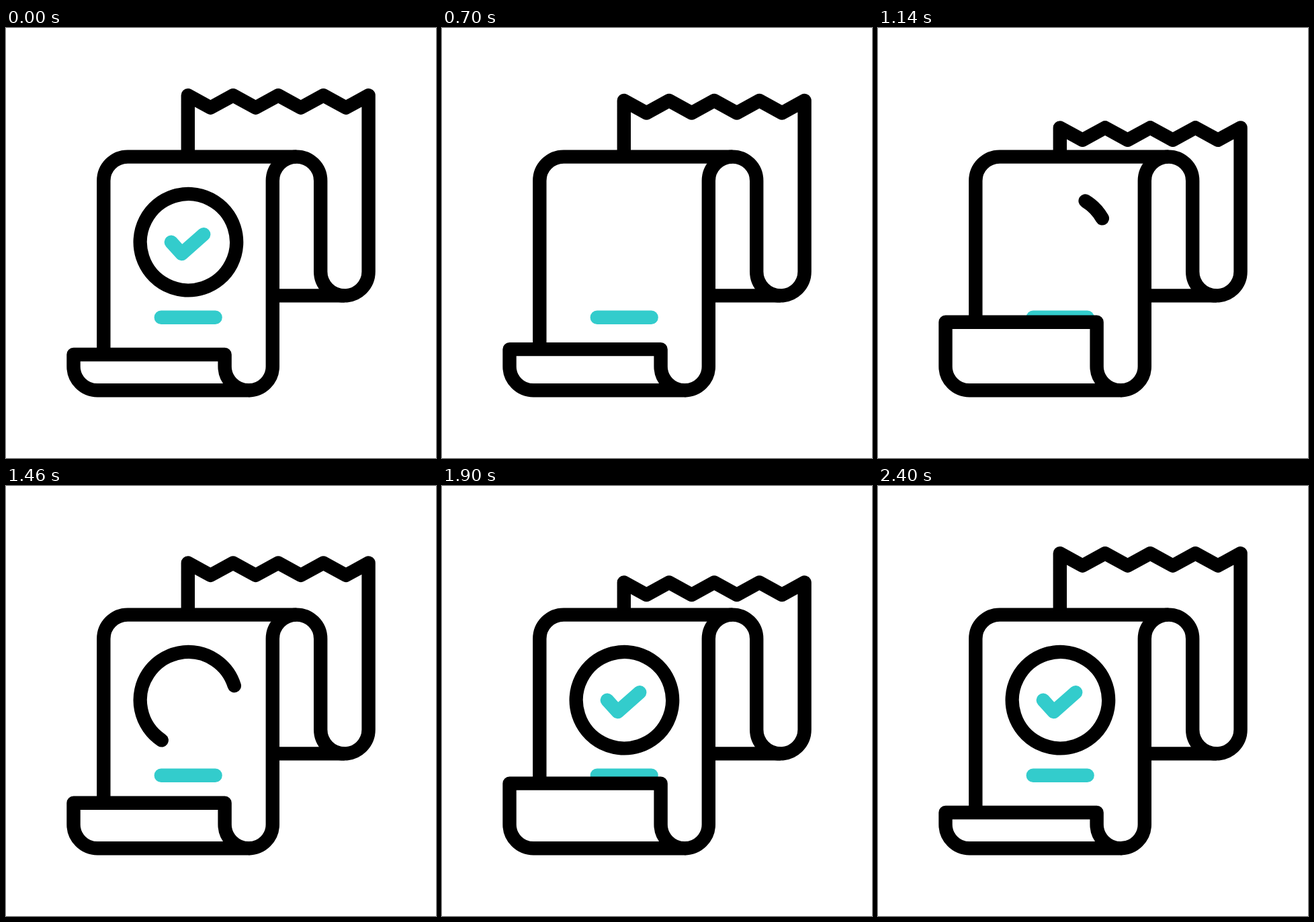
Recreate the animation shown at these times as an HTML page. Size 640 px wide and 640 px high, loop 2.42 s.

```html
<!DOCTYPE html>
<html lang="en">
<head>
<meta charset="utf-8">
<title>Receipt</title>
<style>
  html, body { margin: 0; width: 100%; height: 100%; overflow: hidden; background: #fff; }
  svg { display: block; width: 100vw; height: 100vh; }
  .ink { fill: none; stroke: #000; stroke-width: 20.4; stroke-linecap: round; stroke-linejoin: round; }
  .teal { stroke: #33cccc; }
  .butt { stroke-linecap: butt; }
  .paper { fill: #fff; }
</style>
</head>
<body>
<svg viewBox="0 0 640 640">
  <path id="back" class="ink butt"/>
  <path class="ink butt" d="M145.3 500V227.4A35.8 35.8 0 0 1 181.1 191.6H432.4A35.8 35.8 0 0 1 468.2 227.4V362.6A35.8 35.8 0 0 0 504 398.4"/>
  <path class="ink teal" d="M230.8 430.8H311.6"/>
  <circle id="ring" class="ink" cx="271.4" cy="318.7" r="71.7" pathLength="360"/>
  <path id="check" class="ink teal" d="M245.8 318.7L261.5 336L294.2 307.2" pathLength="100"/>
  <path id="flap" class="ink paper"/>
  <path class="ink butt" d="M432.4 191.6A35.8 35.8 0 0 0 396.8 227.4V503.7A35.6 35.6 0 0 1 361.2 539.3"/>
</svg>
<script>
const LOOP = 2420, SWING = 400, TRAVEL = 51.2, SEAM = 252;
const [back, flap, ring, check] = ['back', 'flap', 'ring', 'check'].map(id => document.getElementById(id));

// Eased progress from 0 to 1 between two times
function ease(t, from, to) {
  const x = Math.min(1, Math.max(0, (t - from) / (to - from)));
  return x * x * (3 - 2 * x);
}

function showPart(el, length, total) {
  el.style.display = length > 0 ? '' : 'none';
  el.setAttribute('stroke-dasharray', length < total ? `${length} ${total * 2}` : 'none');
}

function drawPaper(shift) {
  let tear = '';
  for (let i = 0; i < 9; i++) {
    tear += `L${270.8 + i * 33.6} ${(i % 2 ? 118.6 : 100.2) + shift}`;
  }
  back.setAttribute('d', `M270.8 191.6${tear}V362.6A35.8 35.8 0 0 1 504 398.4H396.8`);
  const top = 486 - shift;
  flap.setAttribute('d', `M100.5 ${top}V503.7A35.6 35.6 0 0 0 136.1 539.3H361.2A35.6 35.6 0 0 1 325.6 503.7V${top}Z`);
}

function drawMarks(t) {
  const erasing = t < 800;
  const gone = ease(t, 0, 600);
  const turn = erasing ? gone : ease(t, 937, 1815);
  const shown = erasing ? 1 - gone : ease(t, 1000, 1805);
  ring.setAttribute('transform', `rotate(${SEAM + 360 * turn} 271.4 318.7)`);
  showPart(ring, 360 * shown, 360);
  showPart(check, 100 * (erasing ? 1 - ease(t, 0, 400) : ease(t, 1500, 1860)), 100);
}

function frame(now) {
  const t = now % LOOP;
  const phase = Math.min(t, 6 * SWING) % (2 * SWING);
  drawPaper(TRAVEL * ease(SWING - Math.abs(phase - SWING), 0, SWING));
  drawMarks(t);
  requestAnimationFrame(frame);
}
frame(0);
</script>
</body>
</html>
```
